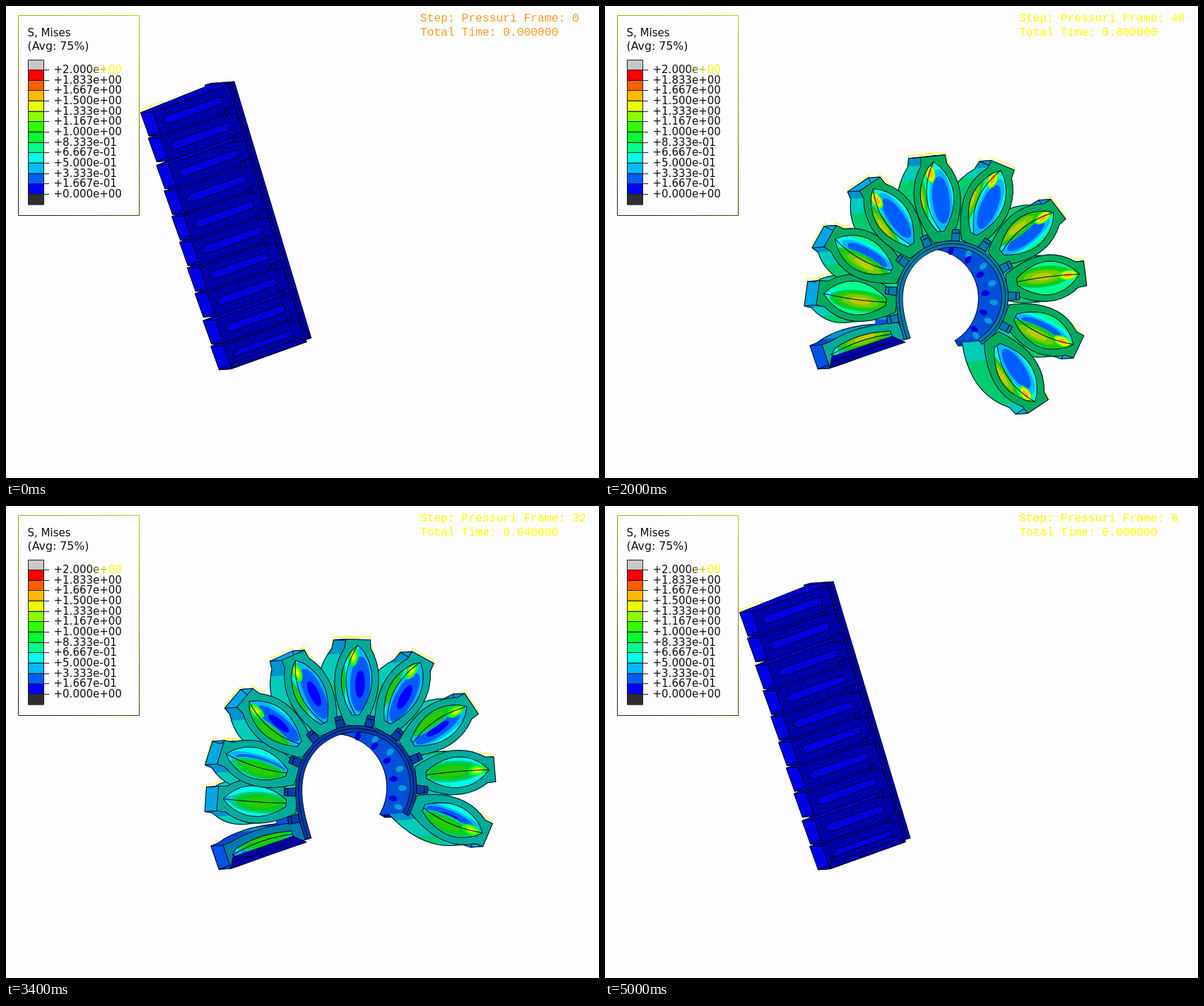
These frames come from a looping animation (839x668 px, 5050 ms). An HTML page with a canvas:

```html
<!DOCTYPE html>
<html lang="en">
<head>
<meta charset="utf-8">
<title>Bending actuator stress</title>
<style>
html, body { margin: 0; width: 100%; height: 100%; overflow: hidden; background: #fdfdff; }
canvas { display: block; }
</style>
</head>
<body>
<canvas id="stage" width="839" height="668"></canvas>
<script>
const ctx = document.getElementById('stage').getContext('2d');
const STEP_MS = 50, STEPS = 101, PEAK = 50, TEETH = 10, STRIP = 9;
const BANDS = [
  [0, 0, 255], [0, 93, 255], [0, 185, 255], [0, 255, 231], [0, 255, 139], [0, 255, 46],
  [46, 255, 0], [139, 255, 0], [231, 255, 0], [255, 185, 0], [255, 93, 0], [255, 0, 0]
];
const ROOT_ANGLE = 163.3 * Math.PI / 180;
const DEPTH = { x: -1, y: 0.07 };
const LINE = '#000018';

const mix = (a, b, t) => a + (b - a) * t;
const rad = degrees => degrees * Math.PI / 180;

// Cubic through four known poses of the bending motion.
const KEYS = [0, 15, 31, 49];
const through = (...values) => f => KEYS.reduce((sum, k, i) =>
  sum + values[i] * KEYS.reduce((p, m, j) => j === i ? p : p * (f - m) / (k - m), 1), 0);
const sweepAt = through(0, 144, 223, 292);
const leadAt = through(80, 75, 55, 22);
const lengthAt = through(379, 360, 355, 343);

function color(stress, shade = 1) {
  const band = BANDS[Math.max(0, Math.min(11, Math.floor(stress * 6)))];
  return `rgb(${band.map(c => Math.round(c * shade)).join()})`;
}

function trace(points, close) {
  ctx.beginPath();
  points.forEach(p => ctx.lineTo(p.x, p.y));
  if (close) ctx.closePath();
}

function polygon(points, fill, stroke = fill) {
  trace(points, true);
  ctx.fillStyle = fill;
  ctx.fill();
  ctx.strokeStyle = stroke;
  ctx.stroke();
}

function polyline(points, stroke = LINE) {
  trace(points);
  ctx.strokeStyle = stroke;
  ctx.stroke();
}

// The clamped strip: curvature ramps up from the root, then stays constant.
function makeSpine(f) {
  const length = lengthAt(f), lead = leadAt(f), count = 180;
  const curvature = rad(sweepAt(f)) / (length - lead);
  const turn = s => s < 2 * lead ? curvature * s * s / (4 * lead) : curvature * (s - lead);
  const ds = length / count;
  const points = [{ x: 432, y: 470, a: ROOT_ANGLE }];
  for (let k = 1; k <= count; k++) {
    const last = points[k - 1];
    const heading = ROOT_ANGLE + Math.PI / 2 + turn((k - 0.5) * ds);
    points.push({
      x: last.x + Math.cos(heading) * ds,
      y: last.y + Math.sin(heading) * ds,
      a: ROOT_ANGLE + turn(k * ds)
    });
  }
  return points;
}

const spinePoint = (spine, s) => spine[Math.round(s / 379 * (spine.length - 1))];
const offset = (p, d) => ({ x: p.x + Math.cos(p.a) * d, y: p.y + Math.sin(p.a) * d, a: p.a });
const behind = (p, d) => ({ x: p.x + DEPTH.x * d, y: p.y + DEPTH.y * d, a: p.a });

function curveSide(x0, y0, cx, cy, x1, y1) {
  return Array.from({ length: 11 }, (_, k) => {
    const t = k / 10;
    return {
      x: mix(mix(x0, cx, t), mix(cx, x1, t), t),
      y: mix(mix(y0, cy, t), mix(cy, y1, t), t)
    };
  });
}

const mirrored = (next, prev) => [...next, ...prev.map(p => ({ x: p.x, y: -p.y })).reverse()];

function makeTooth(spine, i, f) {
  const q = f / 49, swell = Math.sqrt(q), bent = Math.min(1, 2 * swell);
  const root = spinePoint(spine, 15 + 38.3 * i);
  const skew = i === 0 ? -3 : mix(-3, 12 * Math.exp((1 - i) / 2), bent);
  const a = root.a + rad(skew + 0.27 * i * i * q ** 3);
  const length = 121 + 10 * Math.sin(a) ** 2;

  // The clamped tooth swells only a little, and only on its free side.
  const sides = (i ? [1, 1] : [0.35, 0]).map(amount => amount * swell);
  const front = mirrored(...sides.map(s => [
    ...curveSide(STRIP, 17.5 - 5.5 * swell, length * 0.56, 17.5 + 36 * s, length - 12, 17.5 + s),
    { x: length, y: 17.5 }
  ]));
  const panel = mirrored(...sides.map(s => [
    ...curveSide(24, 5, length * 0.56, 6 + 38 * s, length - 16, 6 + 3 * s),
    { x: length - 8, y: 0 }
  ]));
  const depth = { x: DEPTH.x * Math.cos(a) + DEPTH.y * Math.sin(a),
                  y: DEPTH.y * Math.cos(a) - DEPTH.x * Math.sin(a) };
  const back = front.map(p => {
    const d = mix(32, 17, p.x / length);
    return { x: p.x + depth.x * d, y: p.y + depth.y * d };
  });
  return { i, root, a, length, front, back, panel, swell, heat: q ** 0.8 };
}

function inTooth(tooth, draw) {
  ctx.save();
  ctx.translate(tooth.root.x, tooth.root.y);
  ctx.rotate(tooth.a);
  draw(tooth);
  ctx.restore();
}

function drawHalo(tooth) {
  ctx.save();
  ctx.translate(0, -4);
  inTooth(tooth, ({ front, back, length }) => {
    const nearTip = p => p.x > length * 0.8;
    polyline(back.filter(nearTip), '#ffff00');
    polyline(front.filter(nearTip), '#ffff00');
  });
  ctx.restore();
}

function drawSides({ i, front, back, length, heat }) {
  const tip = front.length / 2 - 1;
  const local = i ? heat : heat * 0.5;
  for (let k = 0; k < front.length - 1; k++) {
    const stress = k === tip ? 0.55 : 0.5 + 0.45 * Math.sin(Math.PI * front[k].x / length);
    polygon([front[k], front[k + 1], back[k + 1], back[k]],
      color(stress * local, k === tip ? 0.9 : 0.8));
  }
  polyline(back);
  [tip, tip + 1].forEach(k => polyline([front[k], back[k]]));
}

function contours(x, y, rx, ry, from, to, heat, shade) {
  const rings = 8;
  for (let k = 0; k < rings; k++) {
    const size = Math.sqrt(1 - k / rings);
    ctx.beginPath();
    ctx.ellipse(x, y, rx * size, ry * size, 0, 0, 2 * Math.PI);
    ctx.fillStyle = color(mix(from, to, k / (rings - 1)) * heat, shade);
    ctx.fill();
  }
}

function drawFront({ i, a, length, front, panel, swell, heat }) {
  const lean = Math.sin(a), tilt = Math.abs(lean), bent = Math.min(1, 2 * swell);
  polygon(front, color((i ? 0.85 : 0.6) * heat, 0.67), LINE);

  // A cool dome faces the viewer; the fold turned away from it runs hot.
  const shade = 0.88 + 0.12 * bent, foldShade = 0.88 - 0.08 * bent;
  ctx.save();
  trace(panel, true);
  ctx.clip();
  ctx.fillStyle = color(0.8 * heat, shade);
  ctx.fillRect(0, -60, length, 120);
  contours(length * 0.52, -lean * 5, length * 0.42, 9 + 11 * tilt, 0.78, 0.22, heat, shade);
  contours(length * 0.5, lean * 23, length * 0.36, 16 - 8 * tilt, 0.9, 1.6, heat, foldShade);
  if (i > 2) contours(length - 24, lean * 6, 14, 7, 1.2, 1.95, heat, shade);
  ctx.restore();
  trace(panel, true);
  ctx.strokeStyle = LINE;
  ctx.stroke();
  if (swell) polyline(curveSide(24, 0, length * 0.55, lean * 30, length - 8, 0));

  if (i === 0) {
    polygon([{ x: STRIP, y: -17 }, { x: length, y: -17 }, { x: length - 8, y: -3 }, { x: 24, y: -3 }],
      color(0, 0.67), LINE);
    polyline([{ x: 24, y: -10 }, { x: length - 4, y: -10 }]);
  }
}

function drawBand(spine, distance, facing, paint) {
  for (let k = 0; k < spine.length - 1; k++) {
    if (Math.cos(spine[k].a) * facing < 0) continue;
    const p = offset(spine[k], distance), n = offset(spine[k + 1], distance);
    polygon([p, n, behind(n, 33), behind(p, 33)], paint(k));
  }
}

function drawInnerSurface(spine, heat) {
  drawBand(spine, 0, 1, () => color(0.3 * heat, 0.85));
  for (let k = 0; k < spine.length; k += 7) {
    if (Math.cos(spine[k].a) < 0.25) continue;
    const p = behind(spine[k], k % 2 ? 11 : 23);
    ctx.beginPath();
    ctx.ellipse(p.x, p.y, 6, 4, p.a, 0, 2 * Math.PI);
    ctx.fillStyle = color((k % 2 ? 0.48 : 0.15) * heat, 0.85);
    ctx.fill();
  }
  polyline(spine.filter(p => Math.cos(p.a) > 0).map(p => behind(p, 33)));
}

function drawStrip(spine, heat) {
  const outer = spine.map(p => offset(p, STRIP));
  polygon([...spine, ...outer.reverse()], color(0.45 * heat, 0.67), LINE);
  polyline(spine.map(p => offset(p, STRIP * 0.55)));
}

function drawBridge(spine, i, heat) {
  const p = spinePoint(spine, 34 + 38.3 * i);
  ctx.save();
  ctx.translate(p.x, p.y);
  ctx.rotate(p.a);
  polygon([{ x: STRIP, y: -6 }, { x: 25, y: -5 }, { x: 25, y: 5 }, { x: STRIP, y: 6 }],
    color(0.4 * heat, 0.67), LINE);
  polyline([{ x: 20, y: -5 }, { x: 20, y: 5 }]);
  ctx.restore();
}

function drawActuator(f) {
  const spine = makeSpine(f), heat = (f / 49) ** 0.8;
  const teeth = Array.from({ length: TEETH }, (_, i) => makeTooth(spine, i, f));
  ctx.lineWidth = 1;
  ctx.lineJoin = 'round';
  teeth.filter(t => t.i === TEETH - 1 || f && t.i).forEach(drawHalo);
  drawBand(spine, STRIP, -1, k => color((0.9 + 0.6 * Math.sin(k / 3)) * heat, 0.9));
  const end = spine[spine.length - 1], top = offset(end, STRIP);
  polygon([end, top, behind(top, 33), behind(end, 33)], color(0.2 * heat, 0.7), LINE);
  teeth.forEach(t => inTooth(t, drawSides));
  teeth.forEach(t => inTooth(t, drawFront));
  for (let i = 0; i < TEETH - 1; i++) drawBridge(spine, i, heat);
  drawInnerSurface(spine, heat);
  drawStrip(spine, heat);
}

function gradient(x0, y0, x1, y1, from, to) {
  const g = ctx.createLinearGradient(x0, y0, x1, y1);
  g.addColorStop(0, from);
  g.addColorStop(1, to);
  return g;
}

function label(text, x, y, size, fill = '#111', family = '"DejaVu Sans", sans-serif') {
  ctx.font = `${size}px ${family}`;
  ctx.fillStyle = fill;
  ctx.fillText(text, x, y);
}

function scientific(value) {
  const [digits, power] = value.toExponential(3).split('e');
  return `+${digits}e${power[0]}${power.slice(1).padStart(2, '0')}`;
}

function drawLegend(f) {
  const rowHeight = 14.65, top = 75.5, peak = 2.245 * f / 49;
  ctx.lineWidth = 1;
  ctx.strokeStyle = gradient(60, 296, 188, 20, '#222200', '#c8c800');
  ctx.strokeRect(17.5, 13.5, 171, 283);
  label('S, Mises', 30.5, 43, 15);
  label('(Avg: 75%)', 30.5, 62, 15.8);

  const fills = ['#c8c8c8', ...BANDS.map(b => `rgb(${b.join()})`).reverse(), '#2e2e2e'];
  const first = peak > 2 ? 0 : 1;
  fills.forEach((fill, k) => {
    const y = Math.round(top + k * rowHeight);
    ctx.fillStyle = fill;
    ctx.fillRect(31.5, y + 0.5, 22, rowHeight);
    ctx.strokeStyle = '#222';
    ctx.strokeRect(31.5, y + 0.5, 22, rowHeight);
    if (k < first) return;
    polyline([{ x: 53, y: y + 0.5 }, { x: 61, y: y + 0.5 }], '#222');
    const value = k ? (13 - k) / 6 : peak;
    const ink = k === first ? gradient(118, 0, 145, 0, '#111', '#ffff00') : '#111';
    label(scientific(value), 67.5, y + 4.5, 15, ink);
  });
}

function drawHeader(f, fill) {
  const mono = '"Liberation Mono", monospace';
  label(`Step: Pressuri Frame: ${f}`, 586, 22, 16.3, fill, mono);
  label(`Total Time: ${(f * 0.02).toFixed(6)}`, 586, 41.5, 16.3, fill, mono);
}

function render() {
  const step = Math.floor(performance.now() / STEP_MS) % STEPS;
  const f = PEAK - Math.abs(PEAK - step);
  ctx.fillStyle = '#fdfdff';
  ctx.fillRect(0, 0, 839, 668);
  drawActuator(f);
  drawLegend(f);
  drawHeader(f, step ? '#ffff00' : '#ff9b1e');
  requestAnimationFrame(render);
}
render();
</script>
</body>
</html>
```
